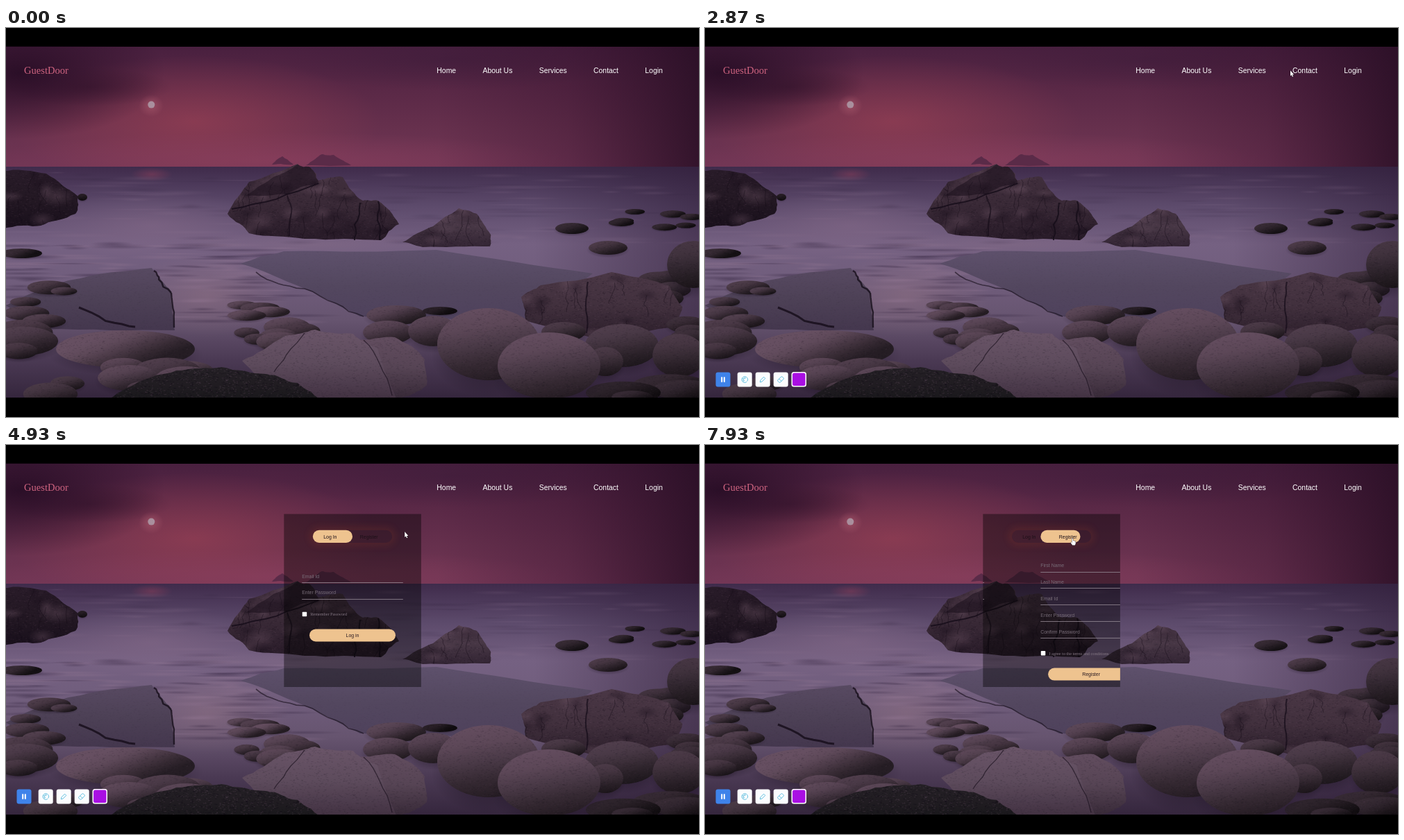
An HTML page with a canvas that plays this animation: 998x561 px, repeating every 8 s.

```html
<!DOCTYPE html>
<html lang="en">
<head>
<meta charset="utf-8">
<title>Login form</title>
<style>
html, body { margin: 0; width: 100%; height: 100%; overflow: hidden; background: #000; }
canvas { display: block; width: 998px; height: 561px; }
</style>
</head>
<body>
<canvas id="stage" width="998" height="561"></canvas>
<script>
const W = 998, H = 561, LOOP = 8000;
const SANS = '"Liberation Sans", Arial, sans-serif';
const SERIF = '"Liberation Serif", "Times New Roman", serif';
const GOLD = '#eec38f';
const ctx = document.getElementById('stage').getContext('2d');

let seed = 11;
const rand = (a = 0, b = 1) => a + (b - a) * ((seed = (seed * 16807) % 2147483647) / 2147483647);
const rgb = (c, k = 1, a = 1) => `rgba(${c.map(v => Math.round(v * k)).join()},${a})`;

// ---------- seascape, painted once ----------
function fade(g, x0, y0, x1, y1, colors) {
  const f = g.createLinearGradient(x0, y0, x1, y1);
  colors.forEach((c, i) => f.addColorStop(i / (colors.length - 1), c));
  return f;
}

function glow(g, x, y, rx, ry, color, alpha) {
  g.save();
  g.translate(x, y);
  g.scale(rx, ry);
  const f = g.createRadialGradient(0, 0, 0, 0, 0, 1);
  [1, 0.5, 0].forEach((k, i) => f.addColorStop(i / 2, rgb(color, 1, alpha * k)));
  g.fillStyle = f;
  g.fillRect(-1, -1, 2, 2);
  g.restore();
}

// Splits every edge in two and nudges the middle, a few times over
function roughen(points, amount, closed = true) {
  for (let pass = 0; pass < 3; pass++, amount /= 2) {
    points = points.flatMap((p, i) => {
      if (!closed && i === points.length - 1) return [p];
      const q = points[(i + 1) % points.length];
      return [p, [(p[0] + q[0]) / 2 + rand(-amount, amount), (p[1] + q[1]) / 2 + rand(-amount, amount)]];
    });
  }
  return points;
}

function trace(points, closed = true) {
  const path = new Path2D();
  points.forEach(p => path.lineTo(...p));
  if (closed) path.closePath();
  return path;
}

function crack(g, from, to, width = 1.3, alpha = 0.6) {
  g.strokeStyle = `rgba(20,12,24,${alpha})`;
  g.lineWidth = width;
  g.stroke(trace(roughen([from, to], 6, false), false));
}

function grain(g, path, x, y, w, h, alpha) {
  g.save();
  g.clip(path);
  for (let i = w * h / 10; i > 0; i--) {
    g.fillStyle = rand() < 0.6 ? `rgba(15,8,20,${alpha})` : `rgba(140,108,132,${alpha * 0.6})`;
    g.fillRect(x + rand(0, w), y + rand(0, h), rand(1, 3), 1);
  }
  g.restore();
}

// A craggy mass: rough outline, shade from top to bottom, slanted facets
function cliff(g, points, top, bottom, { jag = 3, facets = 0, speckle = 0.15 } = {}) {
  const xs = points.map(p => p[0]), ys = points.map(p => p[1]);
  const x = Math.min(...xs), y = Math.min(...ys);
  const w = Math.max(...xs) - x, h = Math.max(...ys) - y;
  const path = trace(roughen(points, jag));
  g.fillStyle = fade(g, 0, y, 0, y + h, [rgb(top), rgb(top, 0.88), rgb(bottom)]);
  g.fill(path);
  grain(g, path, x, y, w, h, speckle);
  g.save();
  g.clip(path);
  for (let i = 0; i < facets; i++) {
    const fx = x + rand(0, w), fy = y + rand(0, h);
    glow(g, fx, fy, rand(8, 30), rand(5, 16), i % 2 ? [24, 14, 26] : [104, 80, 96], 0.4);
    crack(g, [fx, fy], [fx + rand(-12, 12), fy + rand(15, 45)], 1, 0.45);
  }
  g.restore();
}

function stone(g, x, y, rx, ry, tone = 1) {
  const base = [102, 79, 97];
  glow(g, x, y + ry * 0.3, rx * 1.12, ry * 1.15, [24, 15, 29], 0.75);
  const path = new Path2D();
  path.ellipse(x, y, rx, ry, 0, 0, 7);
  g.fillStyle = fade(g, x - rx * 0.1, y - ry, x + rx * 0.1, y + ry, [0.98, 0.9, 0.72, 0.52, 0.36].map(k => rgb(base, k * tone)));
  g.fill(path);
  grain(g, path, x - rx, y - ry, rx * 2, ry * 2, 0.1);
}

function scatter(g, count, [x0, x1], [y0, y1], size, tone, flat = 0.42) {
  for (let i = 0; i < count; i++) {
    const rx = size * rand(0.6, 1.3);
    stone(g, rand(x0, x1), y0 + (y1 - y0) * (i + rand()) / count, rx, rx * flat, tone * rand(0.85, 1.1));
  }
}

function paintSky(g) {
  g.fillStyle = fade(g, 0, 27, 0, 201, ['#49203f', '#592846', '#66304d', '#713655']);
  g.fillRect(0, 27, W, 175);
  glow(g, 270, 135, 270, 95, [152, 64, 84], 0.7);
  glow(g, 390, 190, 420, 40, [146, 66, 96], 0.5);
  glow(g, 20, 65, 210, 95, [38, 12, 36], 0.9);
  glow(g, 120, 85, 120, 28, [45, 16, 40], 0.5);
  glow(g, 640, 45, 260, 45, [62, 28, 58], 0.6);
  g.fillStyle = fade(g, 620, 0, W, 0, ['rgba(48,15,42,0)', 'rgba(48,15,42,.3)', 'rgba(40,14,36,.85)']);
  g.fillRect(620, 27, 378, 175);
  glow(g, 209, 112, 18, 16, [180, 98, 116], 0.5);
  g.fillStyle = '#a98f9d';
  g.beginPath();
  g.arc(209.3, 110.6, 5, 0, 7);
  g.fill();
  g.fillStyle = '#5a2b48';
  g.fill(trace(roughen([[383, 197], [398, 185], [414, 197]], 1.5)));
  g.fill(trace(roughen([[432, 198], [455, 182], [472, 183], [497, 198]], 1.5)));
}

function paintSea(g) {
  g.fillStyle = fade(g, 0, 200, 0, 533, ['#3f2b4b', '#5c4a6b', '#756182', '#705d7c', '#66546f', '#4b3a54', '#35263d']);
  g.fillRect(0, 200, W, 333);
  glow(g, 210, 211, 30, 10, [140, 62, 90], 0.5);
  glow(g, 210, 285, 170, 50, [136, 108, 138], 0.5);
  glow(g, 440, 312, 190, 18, [128, 104, 132], 0.6);
  glow(g, 290, 385, 120, 60, [146, 114, 132], 0.5);
  g.fillStyle = fade(g, 760, 0, W, 0, ['rgba(45,28,55,0)', 'rgba(45,28,55,.55)']);
  g.fillRect(760, 200, 238, 333);
  for (let i = 0; i < 220; i++) {
    const y = rand(205, 425);
    const color = i % 2 ? [50, 35, 62] : [146, 118, 146];
    glow(g, rand(0, y > 310 ? 430 : W), y, rand(15, 75), rand(1.2, 4), color, y > 310 ? 0.35 : 0.16);
  }
}

function paintShore(g) {
  cliff(g, [[338, 340], [400, 322], [620, 320], [845, 354], [745, 425], [510, 416], [430, 376]], [94, 81, 108], [78, 65, 92], { jag: 2, speckle: 0.02 });
  crack(g, [360, 352], [430, 376], 1.6);
  crack(g, [430, 376], [515, 416], 1.6);
  cliff(g, [[0, 400], [90, 364], [210, 346], [238, 380], [243, 436], [60, 434]], [88, 74, 98], [68, 55, 78], { speckle: 0.03 });
  crack(g, [213, 350], [238, 382], 2.4, 0.8);
  crack(g, [238, 382], [242, 432], 2.4, 0.8);
  crack(g, [105, 403], [186, 431], 3, 0.8);

  const dark = [40, 27, 40];
  cliff(g, [[-5, 206], [58, 210], [104, 243], [100, 268], [50, 285], [-5, 289]], dark, [24, 15, 27], { facets: 12 });
  cliff(g, [[319, 268], [350, 222], [420, 196], [438, 201], [450, 220], [485, 215], [514, 249], [536, 249], [566, 283], [540, 306], [430, 304], [350, 296]],
    [66, 48, 62], [40, 27, 40], { facets: 34 });
  g.fillStyle = 'rgba(22,13,25,.5)';
  g.fill(trace(roughen([[345, 242], [385, 215], [420, 197], [438, 201], [450, 222], [404, 240]], 3)));
  crack(g, [325, 261], [450, 224], 2, 0.8);
  crack(g, [405, 242], [408, 300], 2);
  crack(g, [510, 252], [502, 306], 2, 0.8);
  crack(g, [536, 250], [538, 306], 2, 0.8);
  cliff(g, [[571, 309], [615, 286], [652, 260], [678, 268], [698, 298], [697, 315], [600, 316]], [80, 61, 77], [50, 36, 51], { jag: 2, facets: 9 });
}

function paintStones(g) {
  scatter(g, 7, [862, 990], [264, 290], 15, 0.5, 0.28);
  stone(g, 815, 289, 24, 8, 0.55);
  stone(g, 867, 317, 28, 10, 0.75);
  stone(g, 110, 244, 7, 5, 0.4);
  stone(g, 22, 325, 30, 7, 0.55);
  scatter(g, 4, [930, 985], [350, 400], 32, 0.65);
  stone(g, 990, 341, 38, 34, 0.7);
  scatter(g, 5, [10, 85], [368, 425], 26, 0.75, 0.32);
  scatter(g, 4, [340, 390], [398, 416], 22, 0.9, 0.28);
  scatter(g, 4, [5, 50], [430, 470], 42, 0.75);
  stone(g, 172, 463, 100, 27, 1.02);

  scatter(g, 7, [345, 465], [424, 456], 28, 0.85);
  stone(g, 562, 414, 43, 14, 0.9);
  stone(g, 625, 408, 25, 6, 0.4);
  stone(g, 550, 439, 36, 17, 0.9);
  cliff(g, [[742, 388], [770, 371], [872, 352], [955, 372], [974, 402], [965, 432], [860, 450], [748, 422]], [74, 55, 69], [42, 29, 41], { facets: 18 });
  crack(g, [838, 366], [836, 440], 2, 0.7);
  stone(g, 803, 438, 32, 14, 0.75);
  scatter(g, 3, [975, 995], [420, 450], 24, 0.65);
  stone(g, 887, 458, 53, 31, 0.8);
  stone(g, 969, 472, 38, 31, 0.75);
  stone(g, 863, 481, 26, 21, 0.75);
  scatter(g, 4, [870, 980], [514, 532], 45, 0.5, 0.3);
  stone(g, 615, 437, 36, 22, 0.9);

  cliff(g, [[505, 450], [560, 446], [603, 478], [606, 515], [570, 533], [500, 533]], [98, 77, 95], [56, 42, 56], { speckle: 0.1 });
  cliff(g, [[340, 480], [402, 444], [445, 435], [500, 441], [535, 462], [562, 534], [390, 534]], [106, 85, 104], [66, 50, 66], { speckle: 0.1 });
  crack(g, [430, 440], [386, 496]);
  crack(g, [515, 450], [556, 530]);
  stone(g, 695, 456, 74, 52);
  stone(g, 782, 487, 74, 48);
  scatter(g, 9, [5, 280], [486, 530], 38, 0.85);
  cliff(g, [[140, 540], [190, 511], [245, 494], [310, 489], [375, 499], [420, 512], [460, 540]], [36, 32, 37], [24, 23, 26], { speckle: 0.3 });
}

function paintScene() {
  const c = document.createElement('canvas');
  c.width = W;
  c.height = H;
  const g = c.getContext('2d');
  [paintSky, paintSea, paintShore, paintStones].forEach(paint => paint(g));
  g.fillStyle = '#000';
  g.fillRect(0, 0, W, 26.5);
  g.fillRect(0, 533, W, 28);
  return c;
}
const scene = paintScene();

// ---------- interface ----------
function text(str, x, y, size, color, family = SANS, align = 'left') {
  ctx.font = `${size}px ${family}`;
  ctx.textAlign = align;
  ctx.fillStyle = color;
  ctx.fillText(str, x, y);
}

function box(x, y, w, h, r, color) {
  ctx.fillStyle = color;
  ctx.beginPath();
  ctx.roundRect(x, y, w, h, r);
  ctx.fill();
}

const inside = ([px, py], x, y, w, h) => px >= x && px <= x + w && py >= y && py <= y + h;

function drawNav(mouse) {
  text('GuestDoor', 26, 65.8, 14.56, '#cf6480', SERIF);
  let x = 620.3, over = false;
  for (const label of ['Home', 'About Us', 'Services', 'Contact', 'Login']) {
    ctx.font = `10.45px ${SANS}`;
    const w = ctx.measureText(label).width;
    const hot = mouse && inside(mouse, x, 54, w, 13);
    over = over || hot;
    text(label, x, 64.7, 10.45, hot ? '#43d5d3' : '#fff');
    x += w + 38.3;
  }
  return over;
}

function drawTools() {
  box(15.5, 496.5, 21, 21, 3, '#3f83ea');
  for (const x of [23.2, 26.8]) box(x, 503.3, 2, 7.4, 0.5, '#fff');
  for (let i = 0; i < 3; i++) box(46.7 + 26 * i, 496.5, 21, 21, 3, '#fbfcfe');
  box(124.5, 496, 21.5, 21.5, 3.5, '#fff');
  box(126, 497.5, 18.5, 18.5, 2.5, '#a90fe3');
  ctx.strokeStyle = '#53b9dc';
  ctx.lineWidth = 0.9;
  ctx.beginPath();
  ctx.arc(57.3, 507, 4.3, 0.9, 6.9);
  for (let a = 2.4; a < 5; a += 1.2) {
    const x = 57.3 + 2.2 * Math.cos(a), y = 507 + 2.2 * Math.sin(a);
    ctx.moveTo(x + 0.7, y);
    ctx.arc(x, y, 0.7, 0, 7);
  }
  ctx.stroke();
  ctx.stroke(trace([[79.3, 510.8], [80, 507.8], [84.6, 503.2], [86.8, 505.4], [82.2, 510]]));
  ctx.save();
  ctx.translate(109, 507);
  ctx.rotate(-Math.PI / 4);
  ctx.beginPath();
  ctx.roundRect(-4.5, -2.4, 9, 4.8, 1.4);
  ctx.moveTo(-1, -2.4);
  ctx.lineTo(-1, 2.4);
  ctx.stroke();
  ctx.restore();
}

function drawForm(x, y, fields, terms, action) {
  fields.forEach((label, i) => {
    text(label, x, y + i * 23.9 + 2.5, 6.93, '#786d78');
    ctx.fillStyle = '#948994';
    ctx.fillRect(x, Math.round(y + i * 23.9 + 9), 145.6, 0.8);
  });
  const end = y + (fields.length - 1) * 23.9;
  box(x + 0.5, end + 27.9, 6.5, 6.5, 0.8, '#fff');
  text(terms, x + 12, end + 33.4, 6.24, '#867985', SERIF);
  box(x + 10.8, end + 52.5, 124, 18, 9, GOLD);
  text(action, x + 72.8, end + 64, 6.93, '#2a1a22', SANS, 'center');
}

const clamp = p => Math.min(1, Math.max(0, p));

// CSS "ease" timing, solved by bisection
function ease(p) {
  let lo = 0, hi = 1, u = 0.5;
  for (let i = 0; i < 24; i++) {
    u = (lo + hi) / 2;
    if (0.75 * (1 - u) * u + u * u * u < p) lo = u; else hi = u;
  }
  const v = 1 - u;
  return 0.3 * v * v * u + 3 * v * u * u + u * u * u;
}

function drawPanel(k) {
  ctx.save();
  ctx.beginPath();
  ctx.rect(400.3, 99.5, 197.6, 249.6);
  ctx.clip();
  ctx.fillStyle = 'rgba(0,0,0,.4)';
  ctx.fillRect(400, 99, 199, 251);

  // glow around the switch, kept out of its interior
  ctx.save();
  const ring = new Path2D();
  ring.rect(400, 99, 199, 251);
  ring.roundRect(441.8, 122.8, 114.4, 18.2, 9.1);
  ctx.clip(ring, 'evenodd');
  ctx.shadowColor = 'rgba(255,97,36,.1)';
  ctx.shadowBlur = 10.4;
  ctx.shadowOffsetX = 2000;
  box(437 - 2000, 118, 124, 27.6, 13.8, '#000');
  ctx.restore();

  box(441.8 + 57.2 * k, 122.8, 57.2, 18.2, 9.1, GOLD);
  text('Log In', 457.2, 134.5, 6.93, '#1c1018');
  text('Register', 509.8, 134.5, 6.93, '#1c1018');

  drawForm(426.2 - 234 * k, 189, ['Email Id', 'Enter Password'], 'Remember Password', 'Log in');
  drawForm(634.2 - 208 * k, 173.5, ['First Name', 'Last Name', 'Email Id', 'Enter Password', 'Confirm Password'],
    'I agree to the terms and conditions', 'Register');
  ctx.restore();
}

// Each move: begin, end, and the place it reaches
const MOVES = [[470, 670, 790, 165], [930, 1330, 657, 101.5], [1800, 2270, 731.5, 64.3], [2270, 2600, 806, 62],
  [2670, 3400, 940.5, 59.5], [4000, 4930, 574.3, 125], [4930, 6130, 432, 241.2], [6730, 7530, 528.5, 134.5]];

function mouseAt(t) {
  if (t < MOVES[0][0]) return null;
  let x = 893, y = 235;
  for (const [begin, end, nx, ny] of MOVES) {
    const p = clamp((t - begin) / (end - begin));
    x += (nx - x) * p;
    y += (ny - y) * p;
  }
  return [x, y];
}

const ARROW = trace([[0, 0], [0, 8], [1.7, 6.5], [2.9, 9.2], [4.1, 8.7], [2.9, 6], [5.2, 6]]);
const HAND = trace([[0, 0], [1.2, 0], [1.5, 3.6], [5, 4.3], [5.3, 7.5], [4.4, 10], [0.6, 10], [-1.9, 6.6], [-1.2, 5.6], [0, 6.6]]);

function drawMouse([x, y], hand) {
  const shape = hand ? HAND : ARROW;
  ctx.save();
  ctx.translate(x, y);
  ctx.strokeStyle = 'rgba(20,10,20,.7)';
  ctx.lineWidth = 1;
  ctx.stroke(shape);
  ctx.fillStyle = '#fff';
  ctx.fill(shape);
  ctx.restore();
}

function draw(t) {
  const mouse = mouseAt(t);
  ctx.drawImage(scene, 0, 0);
  let hand = drawNav(mouse);
  if (t >= 3670) {
    drawPanel(ease(clamp((t - 7715) / 500)));
    hand = hand || inside(mouse, 442, 123, 110, 18);
  }
  if (t >= 70) drawTools();
  if (mouse) drawMouse(mouse, hand);
}

const start = performance.now();
function tick() {
  draw((performance.now() - start) % LOOP);
  requestAnimationFrame(tick);
}
tick();
</script>
</body>
</html>
```
